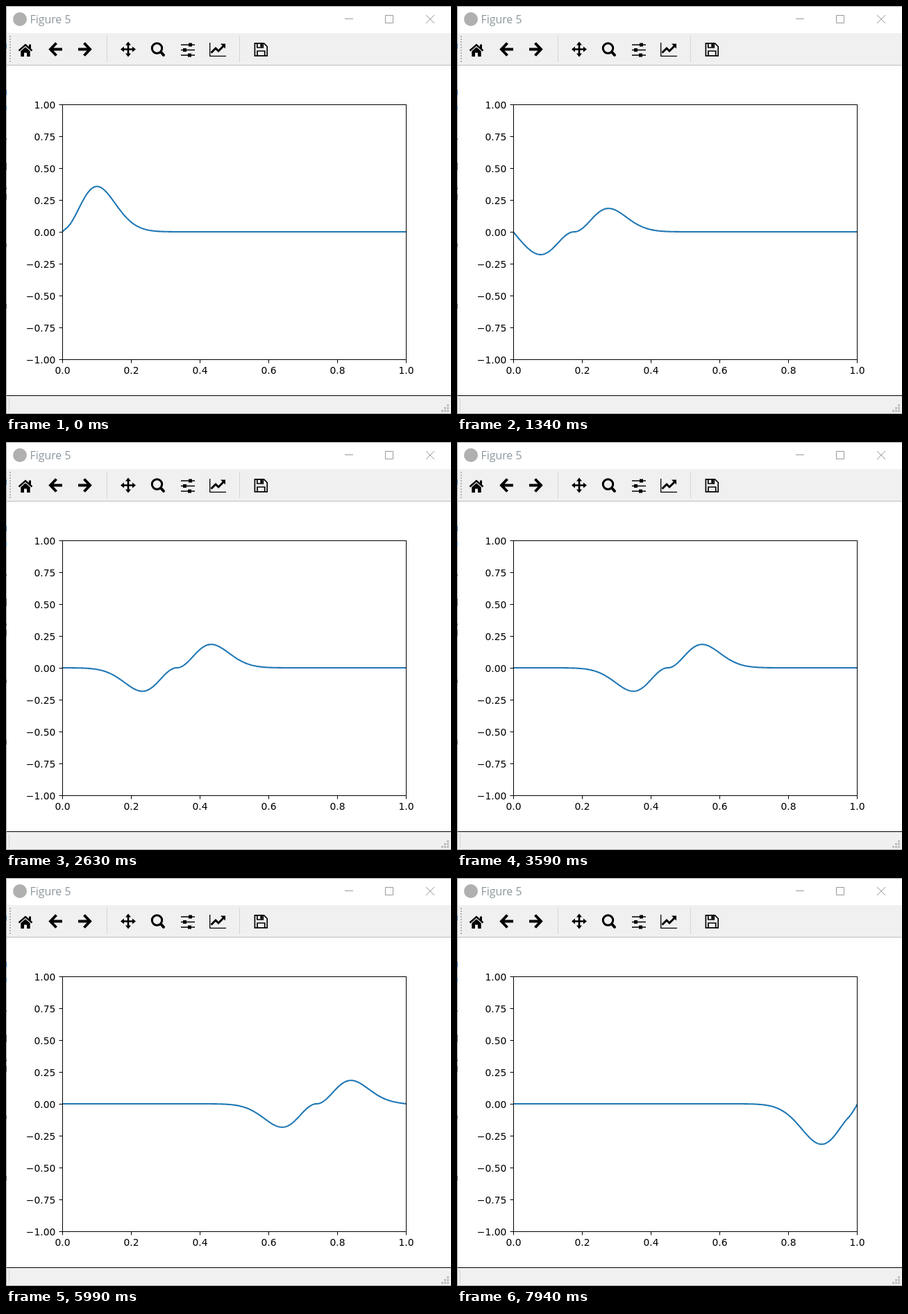
Animation, 641 px wide and 589 px high, one loop 8000 ms. Source, as an HTML page:

```html
<!DOCTYPE html>
<html lang="en">
<head>
<meta charset="utf-8">
<title>Figure 5</title>
<style>
  html, body { margin: 0; width: 100%; height: 100%; overflow: hidden; background: #fff; }
  svg { display: block; width: 641px; height: 589px; }
  .title { font: 15.9px "Open Sans", "Noto Sans", sans-serif; fill: #8d999f; }
  #ticks text { font: 13.89px "DejaVu Sans", sans-serif; }
  .line { fill: none; stroke: #000; }
</style>
</head>
<body>
<svg viewBox="0 0 641 589">
  <defs>
    <clipPath id="plot"><rect x="81" y="142" width="496" height="369"/></clipPath>
    <path id="arrow" class="line" stroke-width="4" d="M81 62.5H66M72.5 53.5L64 62.5L72.5 71.5"/>
    <path id="spoke" d="M174.7 62.5V56.5H172L176 51.5L180 56.5H177.3V62.5Z"/>
  </defs>

  <!-- window frame -->
  <rect width="641" height="589" fill="#fff"/>
  <rect y="39" width="641" height="46" fill="#f0f0f0"/>
  <rect y="85" width="641" height="1" fill="#bdbdbd"/>
  <rect y="562" width="641" height="27" fill="#f0f0f0"/>
  <rect x="1" y="562" width="640" height="1"/>
  <path class="line" style="stroke:#a8a8a8" d="M0 .5H641M.5 0V589M0 588.5H641"/>
  <g id="edge"></g>
  <path class="line" style="stroke:#d4d4d4" d="M4.5 566V586M145.5 43V81M336.5 43V81"/>
  <path class="line" style="stroke:#b4b4b4" stroke-width="2" stroke-dasharray="2 2" d="M6 43V81"/>
  <path style="fill:#bfbfbf" d="M635 575h3v3h-3zM635 579h3v3h-3zM635 583h3v3h-3zM631 579h3v3h-3zM631 583h3v3h-3zM627 583h3v3h-3z"/>

  <!-- title bar -->
  <circle cx="20" cy="19" r="10" fill="#b0b0b0"/>
  <text class="title" x="34.5" y="25">Figure 5</text>
  <path class="line" style="stroke:#999" d="M488 18.5H500M546.5 13.5H557.5V24.5H546.5ZM605 13L617 25M617 13L605 25"/>

  <!-- toolbar -->
  <path class="line" stroke-width="2.4" d="M18.5 64.5L28 56L37.5 64.5"/>
  <path d="M33 55.5H36V62L33 59.5ZM21.3 65.3L28 59.3L34.7 65.3V73H30V67.5H26V73H21.3Z"/>
  <use href="#arrow"/>
  <use href="#arrow" transform="translate(185 0) scale(-1 1)"/>
  <use href="#spoke"/>
  <use href="#spoke" transform="rotate(90 176 62.5)"/>
  <use href="#spoke" transform="rotate(180 176 62.5)"/>
  <use href="#spoke" transform="rotate(270 176 62.5)"/>
  <circle class="line" cx="217.5" cy="61" r="7.2" stroke-width="3"/>
  <path class="line" stroke-width="4" stroke-linecap="round" d="M223.5 67L227 70.8"/>
  <path class="line" stroke-width="1.7" d="M252 56H272M252 63.5H272M252 71H272"/>
  <path d="M263 53.5h5v5h-5zM255 61h5v5h-5zM262 68.5h5v5h-5z"/>
  <path class="line" stroke-width="1.3" d="M293.7 53V72.3H317"/>
  <path class="line" stroke-width="3" d="M295.5 67.5L302 61L306 65L313 58"/>
  <path d="M309 54.5H316V61.5Z"/>
  <path class="line" stroke-width="1.7" d="M358.4 53.8H371.5L376.2 58.5V71.8H358.4ZM362 71.8V65H372.7V71.8M361.8 53.8V60H370.3V53.8"/>
  <rect x="366.3" y="54.5" width="3" height="5"/>

  <!-- plot -->
  <path id="curve" clip-path="url(#plot)" fill="none" stroke="#1f77b4" stroke-width="2.08" stroke-linejoin="round"/>
  <rect class="line" x="81.5" y="142.5" width="495" height="368"/>
  <g id="ticks"></g>
</svg>
<script>
const LOOP = 8000, SAMPLES = 400;
const LEFT = 81, WIDTH = 496, ZERO = 326, UNIT = 183.7;

function tick(x, y, dx, dy, label, tx, ty, anchor) {
  return `<path class="line" d="M${x} ${y}l${dx} ${dy}"/>` +
    `<text x="${tx}" y="${ty}" text-anchor="${anchor}">${label}</text>`;
}
let ticks = '';
for (let i = 0; i < 9; i++) {
  const y = 142.5 + 46 * i;
  const label = (1 - i / 4).toFixed(2).replace('-', '\u2212');
  ticks += tick(81.5, y, -5, 0, label, 71.3, y + 5.4, 'end');
}
for (let i = 0; i < 6; i++) {
  const x = Math.floor(LEFT + 99.1 * i) + 0.5;
  ticks += tick(x, 510.5, 0, 5, (i / 5).toFixed(1), x, 531, 'middle');
}
document.getElementById('ticks').innerHTML = ticks;

// Slivers of the windows behind, seen along the left border: top, height, colour.
document.getElementById('edge').innerHTML = [
  [54, 8, '#2a6ea8'], [121, 8, '#2a6ea8'], [144, 6, '#3b8fc9'], [191, 2, '#444'],
  [226, 11, '#555'], [262, 3, '#555'], [271, 9, '#555'], [343, 5, '#555'], [430, 7, '#555']
].map(([y, h, fill]) => `<rect y="${y}" width="1" height="${h}" fill="${fill}"/>`).join('');

// Runs of redraws: first time, last time, count. Every fourth gap is shorter,
// and a late run starts with a few quick redraws to catch up.
const runs = [
  [50, 820, 13], [890, 1670, 13], [1720, 2490, 13], [2560, 3010, 8], [3160, 3730, 11],
  [4000, 4760, 14], [4830, 5610, 13], [5660, 6440, 13], [6510, 7280, 13], [7350, 7940, 10]
];
const rhythm = i => 70 * i - 20 * Math.floor((i + 1) / 4);
const redraws = runs.flatMap(([first, last, count]) => {
  const lag = rhythm(count - 1) - (last - first);
  return Array.from({ length: count }, (_, i) => first + Math.max(10 * i, rhythm(i) - lag));
});
redraws.push(LOOP);

// String fixed at both ends: two half-height copies of the odd pulse moving apart.
const pulse = x => Math.sign(x) * 100 * x * x * Math.exp(-100 * x * x);
const odd = x => pulse(x) + pulse(x - 2);
const height = (x, shift) => (odd(x - shift) + odd(x + shift)) / 2;

const curve = document.getElementById('curve');
function draw(time) {
  const shown = redraws.find(t => t > time);
  const shift = 0.0065 + 0.0001208 * shown;
  let d = '';
  for (let i = 0; i <= SAMPLES; i++) {
    const x = i / SAMPLES;
    d += (i ? 'L' : 'M') + (LEFT + WIDTH * x).toFixed(2) + ' ' +
      (ZERO - UNIT * height(x, shift)).toFixed(2);
  }
  curve.setAttribute('d', d);
}

const start = performance.now();
function frame() {
  draw((performance.now() - start) % LOOP);
  requestAnimationFrame(frame);
}
frame();
</script>
</body>
</html>
```
